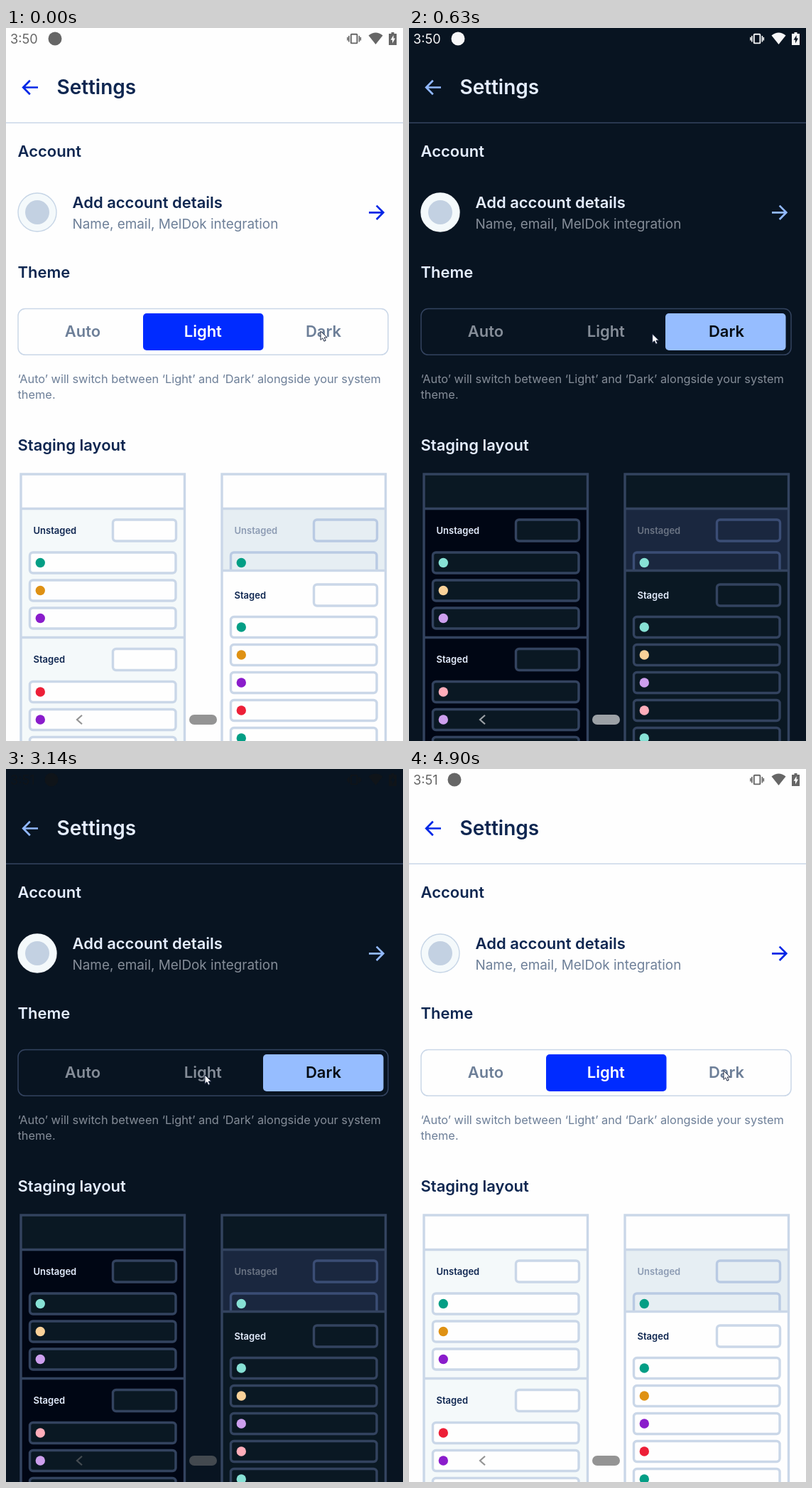
Animation of 559x1002 px, one loop 4.94 s. Source, as an HTML page:

```html
<!DOCTYPE html>
<html lang="en">
<head>
<meta charset="utf-8">
<title>Settings theme switch</title>
<style>
  html, body { margin: 0; width: 100%; height: 100%; overflow: hidden; }
  svg { display: block; width: 100%; height: 100%; background: var(--bg); }
  text { font-family: Inter, Roboto, sans-serif; font-weight: 600; fill: var(--text); }
  .light {
    --bg: #fefefe; --text: #0e2650; --muted: #6d7f98; --line: #cad7e8; --accent: #0027e6;
    --thumb: #002bff; --on-thumb: #fff; --panel: #f4f9fa; --card: #fefefe; --avatar: #c6d5e6;
    --dim: #e6eef3; --dim-line: #b9cae3; --dim-text: #8c9bb3;
    --green: #039e85; --orange: #df9113; --purple: #8a1ccb; --red: #ed1f37;
  }
  .dark {
    --bg: #081421; --text: #e5eeff; --muted: #858d98; --line: #33435f; --accent: #91b8ff;
    --thumb: #96bdff; --on-thumb: #050c14; --panel: #000614; --card: #0a1823; --avatar: #f4f9fb;
    --dim: #1a273f; --dim-line: #3b4d75; --dim-text: #6b7484;
    --green: #87e1d5; --orange: #fad199; --purple: #cd9fee; --red: #ffadba;
  }
  .title { font-size: 28px; }
  .heading, .option { font-size: 22px; }
  .option { text-anchor: middle; fill: var(--muted); }
  .active { fill: var(--on-thumb); }
  .detail { font-size: 18.9px; }
  .note { font-size: 16.35px; }
  .detail, .note { font-weight: 400; fill: var(--muted); }
  .label { font-size: 13px; }
  .clock { font-size: 18.2px; font-weight: 400; fill: currentColor; }
  .arrow { fill: none; stroke: var(--accent); stroke-width: 2.7; }
  .thin { fill: none; stroke: var(--line); stroke-width: 1.5; }
  .box { fill: var(--card); stroke: var(--line); stroke-width: 3.4; }
  .dim .box { fill: var(--dim); stroke: var(--dim-line); }
  .dim text { fill: var(--dim-text); }
</style>
</head>
<body>
<svg id="stage" class="light" viewBox="0 0 559 1002" preserveAspectRatio="none"></svg>
<script>
const stage = document.getElementById('stage');

const text = (cls, x, y, str) => `<text class="${cls}" x="${x}" y="${y}">${str}</text>`;
const rect = (cls, x, y, w, h, r = 0) =>
  `<rect class="${cls}" x="${x}" y="${y}" width="${w}" height="${h}" rx="${r}"/>`;
const fill = (color, x, y, w, h) =>
  `<rect x="${x}" y="${y}" width="${w}" height="${h}" fill="var(--${color})"/>`;

// Section title with its button; x is the left edge of the panel, y the row centre.
const section = (x, y, name) =>
  text('label', x + 18.5, y + 4.6, name) + rect('box', x + 130.5, y - 15, 89, 30, 4.5);

const row = (x, y, color) =>
  rect('box', x + 13.5, y - 14.5, 205.5, 29, 4.5) +
  `<circle cx="${x + 28.3}" cy="${y}" r="6.7" fill="var(--${color})"/>`;

const rows = (x, y, colors) => colors.map((c, i) => row(x, y + 39 * i, c)).join('');

const frame = (x, dividers) =>
  `<g fill="none" stroke="var(--line)" stroke-width="3.4"><rect x="${x + 1}" y="627" width="230.5" height="400"/>` +
  dividers.map(y => `<path d="M${x + 1} ${y}h230.5"/>`).join('') + '</g>';

const leftPanel = x =>
  fill('card', x, 627, 232, 48) + fill('panel', x, 675, 232, 327) +
  section(x, 706, 'Unstaged') + rows(x, 751.5, ['green', 'orange', 'purple']) +
  section(x, 887.5, 'Staged') + rows(x, 933, ['red', 'purple', 'green']) +
  frame(x, [675.5, 856.5]);

const rightPanel = x =>
  fill('card', x, 627, 232, 375) + fill('dim', x, 675, 232, 87) +
  `<g class="dim" clip-path="url(#cover)">${section(x, 706, 'Unstaged')}${row(x, 751.5, 'green')}</g>` +
  section(x, 797, 'Staged') + rows(x, 842, ['green', 'orange', 'purple', 'red', 'green']) +
  frame(x, [675.5, 762.5]);

stage.innerHTML = `
  <clipPath id="cover"><rect x="300" y="675" width="240" height="87"/></clipPath>
  <g id="status">
    <text class="clock" id="clock" x="6" y="22"></text>
    <circle id="badge" cy="15" r="9.5" fill="currentColor"/>
    <g fill="none" stroke="currentColor" stroke-width="1.9">
      <rect x="485.8" y="8.8" width="8.6" height="12.6" rx="1"/>
      <path d="M482.8 11v8.4M497.4 11v8.4M480.9 13v4.4M499.3 13v4.4" stroke-width="1.6"/>
    </g>
    <path d="M510.5 10.5Q520.5 2.5 530.5 10.5L520.5 23Z" fill="currentColor"/>
    <path d="M539 8h3.5V6h4v2h3.5v16H539Z" fill="currentColor"/>
    <path d="M545.6 10l-4 6.7h2.4v4.8l4-7h-2.4Z" fill="var(--bg)"/>
  </g>
  <path class="arrow" d="M45 83.5H24.5M33.8 73.8L24.2 83.5L33.8 93.2"/>
  ${text('title', 71.5, 92.5, 'Settings')}
  <path class="thin" d="M0 133.2H559"/>
  ${text('heading', 16.5, 180.5, 'Account')}
  <circle cx="44" cy="259" r="27" fill="#f4f9fb" stroke="var(--avatar)" stroke-width="1.4"/>
  <circle cx="44" cy="259" r="17" fill="#c3d1e2"/>
  ${text('heading', 93.5, 252.5, 'Add account details')}
  ${text('detail', 93.5, 281.5, 'Name, email, MelDok integration')}
  <path class="arrow" d="M511 259.3H531M521.7 249.6L531.3 259.3L521.7 269"/>
  ${text('heading', 16.5, 351.3, 'Theme')}
  ${rect('thin', 17, 394.5, 521, 64.8, 10)}
  <rect id="thumb" y="401" width="169.5" height="52" rx="5" fill="var(--thumb)"/>
  ${text('option', 108, 434, 'Auto')}
  ${text('option', 277.3, 434, 'Light')}
  ${text('option', 447, 434, 'Dark')}
  ${text('note', 16.5, 499, '‘Auto’ will switch between ‘Light’ and ‘Dark’ alongside your system')}
  ${text('note', 16.5, 521, 'theme.')}
  ${text('heading', 16.5, 593.8, 'Staging layout')}
  ${leftPanel(20)}
  ${rightPanel(303)}
  <g id="nav">
    <path d="M107 965.8L100 972L107 978.2" fill="none" stroke="currentColor" stroke-width="2.2"/>
    <rect x="258" y="965" width="39" height="14" rx="7" fill="currentColor"/>
  </g>
  <path id="cursor" d="M0 0V12.4L2.9 9.8L4.9 14.2L7.2 13.2L5.2 9H9.2Z"
        fill="#fff" stroke="#1c2740" stroke-width="1"/>`;

const [status, clock, badge, thumb, nav, cursor] =
  ['status', 'clock', 'badge', 'thumb', 'nav', 'cursor'].map(id => document.getElementById(id));
const [, light, dark] = document.querySelectorAll('.option');

const LOOP = 4940, TO_DARK = 630, CLOCK_TICK = 1430, TO_LIGHT = 3190;
const ramp = (t, from, to) => Math.min(1, Math.max(0, (t - from) / (to - from)));
const smooth = p => p * p * (3 - 2 * p);

// time, x, y of the pointer tip
const pointer = [
  [0, 443, 426], [200, 443, 426], [580, 356, 429.5], [630, 343, 430], [980, 281, 430],
  [2500, 281, 430], [3140, 280, 430], [3620, 280, 430], [4190, 440, 427], [4710, 443, 424], [4940, 443, 424]
];
// Speed entering and leaving the middle of the first sweep stays continuous.
const eases = { 1: p => p ** 1.3, 2: p => p, 3: p => 1 - (1 - p) ** 1.7 };

function pointerAt(t) {
  const i = pointer.findIndex((_, k) => t < pointer[k + 1][0]);
  const [t0, x0, y0] = pointer[i], [t1, x1, y1] = pointer[i + 1];
  const p = (eases[i] || smooth)(ramp(t, t0, t1));
  return [x0 + (x1 - x0) * p, y0 + (y1 - y0) * p];
}

// System bar ink goes from translucent black (0) to white (1).
const ink = (k, a0, a1) => `rgba(${Array(3).fill(Math.round(255 * k))},${a0 + (a1 - a0) * k})`;

function draw(now) {
  const t = now % LOOP;
  const isDark = t >= TO_DARK && t < TO_LIGHT;
  const toWhite = ramp(t, 400, 560);
  stage.setAttribute('class', isDark ? 'dark' : 'light');
  status.style.color = ink(toWhite - ramp(t, 2980, 3155), 0.6, 0.97);
  nav.style.color = ink(toWhite - ramp(t, 3090, 3190), 0.42, 0.6);

  const ticked = t >= CLOCK_TICK;
  clock.textContent = ticked ? '3:51' : '3:50';
  badge.setAttribute('cx', ticked ? 64 : 69);

  const settle = start => Math.exp((start - t) / 60);
  const x = isDark ? 362 - settle(TO_DARK) : t < TO_DARK ? 193 : 193 + 11 * settle(TO_LIGHT);
  thumb.setAttribute('x', x);
  light.classList.toggle('active', !isDark);
  dark.classList.toggle('active', isDark);

  cursor.setAttribute('transform', `translate(${pointerAt(t)})`);
}

const start = performance.now();
(function tick() {
  draw(performance.now() - start);
  requestAnimationFrame(tick);
})();
</script>
</body>
</html>
```
